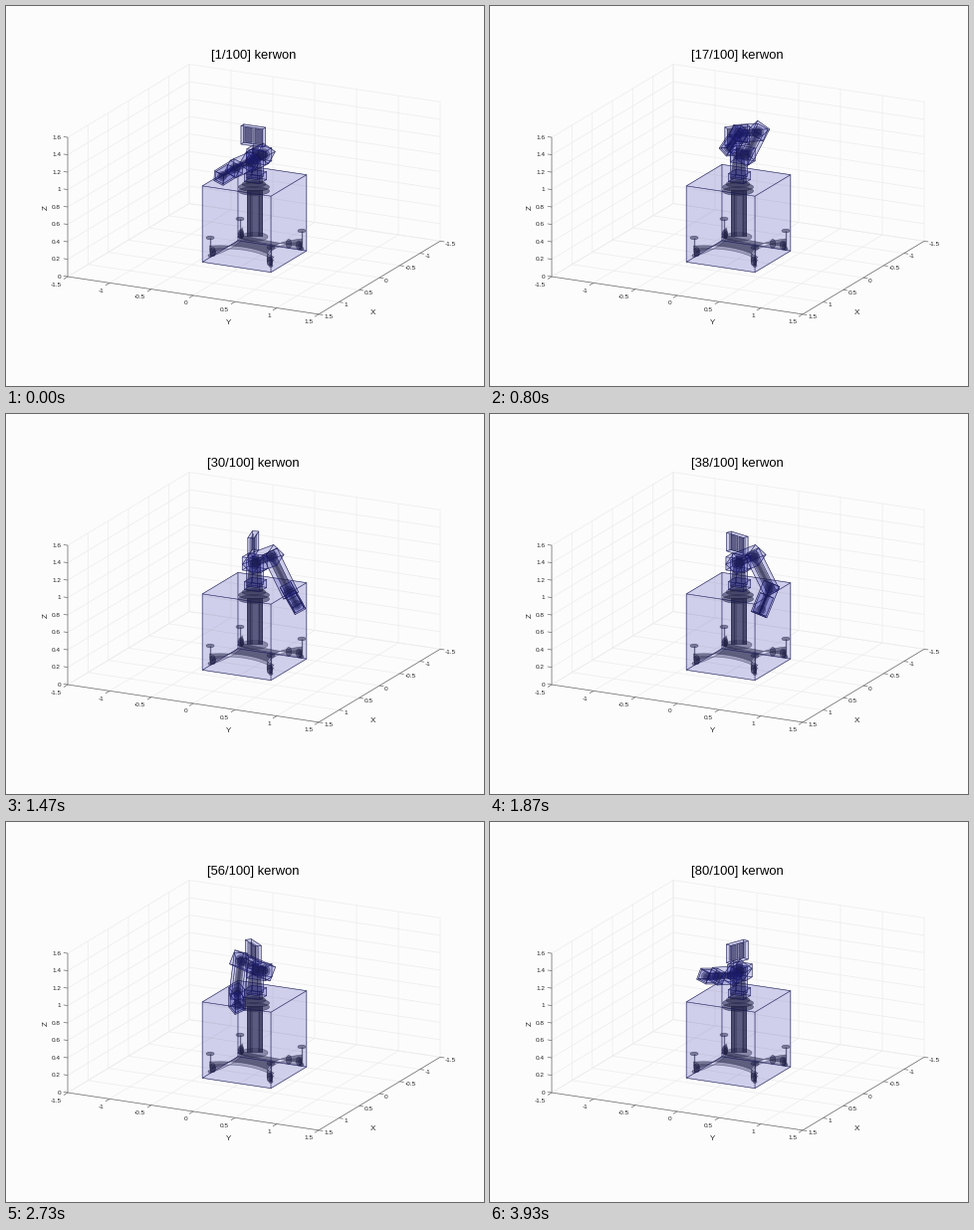
A matplotlib script for the animation above (3990 ms loop, 480x382 px).

```python
import numpy as np
import matplotlib.pyplot as plt
from matplotlib.animation import FuncAnimation
from matplotlib.collections import LineCollection, PolyCollection
from matplotlib.patches import Ellipse, PathPatch, Polygon, Rectangle
from matplotlib.path import Path

W, H, DPI = 480, 382, 100
PT = 72 / DPI
FRAMES, LOOP = 60, 3990
NAME = "kerwon"

plt.rcParams["font.family"] = "Liberation Sans"
fig = plt.figure(figsize=(W / DPI, H / DPI), dpi=DPI, facecolor="#fcfcfc")
ax = fig.add_axes([0, 0, 1, 1])
ax.set_xlim(0, W)
ax.set_ylim(H, 0)
ax.axis("off")

# Orthographic view: pixel step per metre along each world axis
VX = np.array([-40.67, 24.5])
VY = np.array([84.0, 12.6])
VZ = np.array([0.0, -87.5])
ORIGIN = np.array([249.0, 254.2])

THIN = 0.6 * PT


def dark(alpha):
    return (0.13, 0.13, 0.18, alpha)


BOX_STYLE = dict(facecolors=[(0.1, 0.1, 0.65, 0.1)],
                 edgecolors=[(0.1, 0.1, 0.32, 0.6)], linewidths=THIN)


def proj(x, y, z):
    return ORIGIN + x * VX + y * VY + z * VZ


def lines(segs, color, width, z):
    ax.add_collection(LineCollection(segs, colors=[color],
                                     linewidths=width * PT, zorder=z))


def label(p, text, size=6.4, ha="center", va="center", **kw):
    ax.text(*p, text, fontsize=size * PT, color="#262626", ha=ha, va=va, **kw)


def draw_axes():
    lo, hi, top = -1.5, 1.5, 1.6
    ticks = np.linspace(lo, hi, 7)
    heights = np.linspace(0, top, 9)
    grid = []
    for t in ticks:
        grid.append([proj(t, hi, 0), proj(t, lo, 0), proj(t, lo, top)])
        grid.append([proj(hi, t, 0), proj(lo, t, 0), proj(lo, t, top)])
    for z in heights:
        grid.append([proj(hi, lo, z), proj(lo, lo, z), proj(lo, hi, z)])
    lines(grid, "#ececec", 0.7, 1)

    frame = [[proj(hi, lo, top), proj(hi, lo, 0), proj(hi, hi, 0), proj(lo, hi, 0)]]
    for t in ticks:
        px, py = proj(t, hi, 0), proj(hi, t, 0)
        frame += [[px, px + VY * 0.05], [py, py + VX * 0.1]]
        label(px + (5, 3), f"{t:g}", ha="left")
        label(py + (-6, 8), f"{t:g}", ha="right")
    for z in heights:
        p = proj(hi, lo, z)
        frame.append([p, p - VY * 0.05])
        label(p - (7, 0.5), f"{z:.2g}", ha="right", va="center_baseline")
    lines(frame, "#6a6a6a", 0.7, 2)

    label((368, 309), "X", 8)
    label((223, 319), "Y", 8)
    label((40, 203), "Z", 8, rotation=90)


def box(c, *axes):
    """Six faces of a box from its centre and three half-axes on screen."""
    faces = []
    for i in range(3):
        u, v, n = axes[i], axes[(i + 1) % 3], axes[(i + 2) % 3]
        for s in (-1, 1):
            m = np.asarray(c) + s * n
            faces.append([m - u - v, m + u - v, m + u + v, m - u + v])
    return faces


def add_boxes(faces, z):
    coll = PolyCollection(faces, zorder=z, **BOX_STYLE)
    ax.add_collection(coll)
    return coll


def ellipse(p, w, h, alpha=0.6):
    ax.add_patch(Ellipse(p, w, h, fc=dark(alpha * 0.8), ec=dark(alpha),
                         lw=THIN, zorder=3))


def draw_base():
    hub = np.array([250.0, 236.0])
    feet = np.array([(205, 233), (266, 243), (297, 226), (235, 214)], float)
    tips = feet + (0, 12)

    # Star of four legs joined by concave arcs
    dirs = (tips - hub) / np.linalg.norm(tips - hub, axis=1)[:, None]
    side = 4 * np.column_stack([dirs[:, 1], -dirs[:, 0]])
    verts, codes = [tips[0] - side[0]], [Path.MOVETO]
    for i in range(4):
        j = (i + 1) % 4
        ctrl = hub + 0.2 * ((tips[i] + tips[j]) / 2 - hub)
        verts += [ctrl, tips[j] + side[j], tips[j] - side[j]]
        codes += [Path.CURVE3, Path.CURVE3, Path.LINETO]
    for dy, alpha in ((3, 0.28), (0, 0.5)):
        ax.add_patch(PathPatch(Path(np.array(verts) + (0, dy), codes),
                               fc=dark(alpha), ec=dark(0.5), lw=THIN, zorder=3))

    for p in feet:
        wheel = p + 0.06 * (hub - p) + (0, 14)
        ellipse(p, 8, 3.6)
        ellipse(p + (0, 18), 4, 3)
        lines([[p, p + (0, 18)]], dark(0.6), 1.3, 3)
        ellipse(wheel, 5.5, 9)
        ellipse(wheel + 1, 3, 6)
    ellipse((284, 239), 5.5, 9)

    ellipse((249.5, 232), 27, 9, 0.5)
    ax.add_patch(Rectangle((242, 185), 15.5, 47, fc=dark(0.75), ec="none", zorder=3))
    lines([[(249.5, 190), (249.5, 231)]], (0.75, 0.75, 0.85, 0.2), 5, 3)
    lines([[(249.7 + d, 186), (249.7 + d, 231)] for d in (-7.7, -4.6, 4.6, 7.7)],
          dark(0.6), 0.8, 3)
    for y, w in ((186, 31), (182, 31), (179, 24)):
        ellipse((249, y), w, w * 0.27, 0.65)

    add_boxes(box((249.5, 213.5), VX * 0.44, VY * 0.41, VZ * 0.437), 4)


def draw_tower():
    ax.add_patch(Polygon([(241, 178), (258, 178), (255, 150), (245, 150)],
                         fc=dark(0.6), ec=dark(0.5), lw=THIN, zorder=5))
    lines([[(249.5, 141), (249.5, 152)]], dark(0.6), 7, 5)
    add_boxes(box((250.5, 171.5), VX * 0.09, VY * 0.09, VZ * 0.045)
              + box((250, 159), VX * 0.07, VY * 0.065, VZ * 0.15), 6)


# tick, elbow xy, wrist xy, tool xy, head pan in degrees
KEYS = np.array([
    (1, 246, 156, 230, 163, 217, 171, 0),
    (10, 288, 143, 317, 148, 331, 153, 24),
    (17, 269, 127, 250, 128, 240, 143, 48),
    (30, 267, 143, 284, 178, 292, 192, 105),
    (38, 265, 143, 281, 175, 272, 197, 160),
    (46, 268, 138, 279, 153, 288, 165, 158),
    (56, 236, 139, 232, 171, 232, 184, 140),
    (62, 239, 147, 244, 176, 254, 189, 152),
    (69, 246, 151, 239, 158, 251, 164, 180),
    (80, 244, 154, 228, 155, 217, 155, 250),
], float)
T, V = KEYS[:, 0], KEYS[:, 1:]
SLOPE = np.gradient(V, T, axis=0)
REF = np.array([0.6, -0.75, -0.3])
ROOT = np.array([250.0, 150.0])


def pose(t):
    """Cubic Hermite path through the key poses."""
    k = int(np.clip(np.searchsorted(T, t, "right") - 1, 0, len(T) - 2))
    h = T[k + 1] - T[k]
    s = (t - T[k]) / h
    v = ((1 + 2 * s) * (1 - s) ** 2 * V[k] + s * (1 - s) ** 2 * h * SLOPE[k]
         + s * s * (3 - 2 * s) * V[k + 1] + s * s * (s - 1) * h * SLOPE[k + 1])
    shoulder = (254.5 + 6 * np.cos(2 * np.pi * (t - 8) / 54), 149.5)
    return np.vstack([shoulder, v[:6].reshape(3, 2)]), np.radians(v[6])


def link_box(p, q, length, half, pad):
    """Box around a link; the hidden part of its length points at the viewer."""
    d = q - p
    a = np.array([*d, np.sqrt(max(length ** 2 - d @ d, 0))])
    a /= np.linalg.norm(a)
    b = np.cross(a, REF)
    b /= np.linalg.norm(b)
    c = np.cross(a, b)
    flat = max(np.hypot(*a[:2]), 1e-6)
    along = a[:2] / flat * (np.hypot(*d) / 2 + pad * flat)
    return box((p + q) / 2, along, b[:2] * half, c[:2] * half)


def head_parts(pan):
    c, s = np.cos(pan), np.sin(pan)
    wide = (c * VY - s * VX) * 0.13
    deep = (c * VX + s * VY) * 0.035
    tall = VZ * 0.105
    mid = np.array([248.3, 130.5])
    u, v = wide * 0.36, tall * 0.8
    panels = []
    for side in (-0.45, 0.45):
        for off in (-0.5, 0.5):
            o = mid + wide * side + deep * off
            panels.append([o - u - v, o + u - v, o + u + v, o - u + v])
    return box(mid, wide, deep, tall), panels


draw_axes()
draw_base()
draw_tower()

tubes = LineCollection([], colors=[dark(0.55)], capstyle="round", zorder=7,
                       linewidths=[w * PT for w in (9, 8.5, 7.5, 7)])
cores = LineCollection([], colors=[dark(0.45)], linewidths=3 * PT, zorder=7)
joints = PolyCollection([], facecolors=[dark(0.4)], edgecolors=[dark(0.6)],
                        linewidths=THIN, zorder=7)
screen = PolyCollection([], facecolors=[(0.13, 0.13, 0.25, 0.4)],
                        edgecolors=[dark(0.5)], linewidths=THIN, zorder=7)
for art in (tubes, cores, joints, screen):
    ax.add_collection(art)
boxes = add_boxes([], 8)
title = ax.text(248.5, 50, "", fontsize=13 * PT, color="black",
                ha="center", va="center")

lines([[(W - 0.5, 0), (W - 0.5, H)], [(0, H - 0.5), (W, H - 0.5)]], "#b4b4b4", 1, 9)

ANG = np.linspace(0, 2 * np.pi, 20, endpoint=False)
RING = np.column_stack([np.cos(ANG), np.sin(ANG)])


def update(i):
    tick = round(1 + i * 4 / 3)
    title.set_text(f"[{tick}/100] {NAME}")
    pts, pan = pose(tick)
    s, e, w, h = pts

    segs = [[ROOT, s], [s, e], [e, w], [w, h]]
    tubes.set_segments(segs)
    cores.set_segments(segs)
    joints.set_verts([p + RING * (6 - k / 2) for k, p in enumerate(pts)])

    head, panels = head_parts(pan)
    screen.set_verts(panels)
    faces = head + box((ROOT + s) / 2, VX * 0.08, VY * 0.11, VZ * 0.075)
    faces += link_box(s, e, 33, 7.5, 6)
    faces += link_box(e, w, 36, 6.5, 5)
    faces += link_box(w, h, 20, 6, 5)
    faces += link_box((w + h) / 2, h, 10, 5, 4)
    boxes.set_verts(faces)
    return tubes, cores, joints, screen, boxes, title


anim = FuncAnimation(fig, update, frames=FRAMES, interval=LOOP / FRAMES,
                     repeat=True, repeat_delay=0, blit=False)
plt.show()
```
